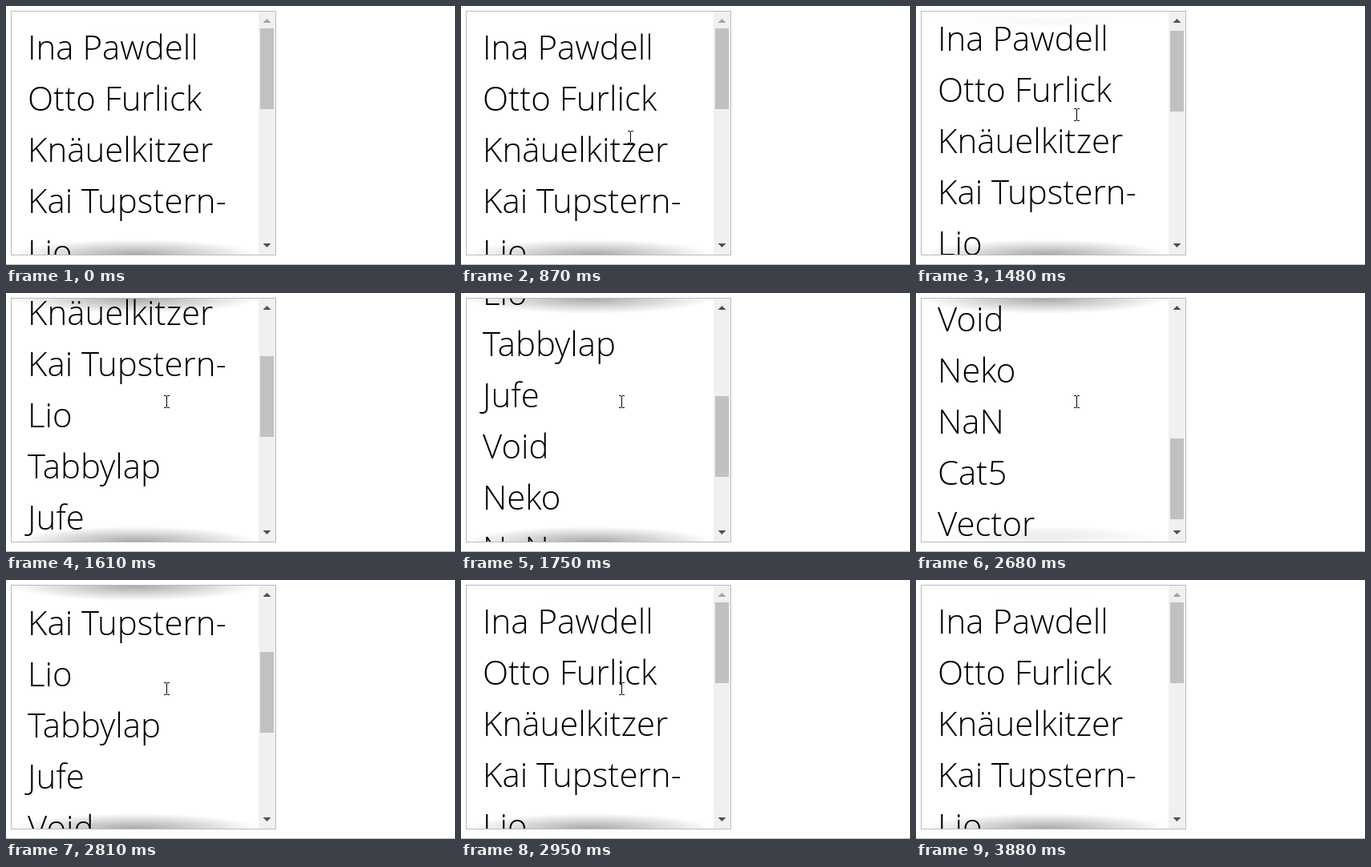
An HTML page for the animation above (4.48 s loop, 560x324 px).

```html
<!DOCTYPE html>
<html lang="en">
<head>
<meta charset="utf-8">
<title>Scrolling shadows</title>
<style>
html, body { margin: 0; width: 100%; height: 100%; overflow: hidden; background: #fff; }
#stage { position: relative; width: 560px; height: 324px; overflow: hidden; }
#stage > * { position: absolute; }
#rule { left: 0; top: 323px; width: 560px; height: 1px; background: #bbb; }
#frame { left: 6px; top: 6px; width: 329px; height: 304px; border: 1px solid #bbb; }
#list {
  left: 7px; top: 7px; width: 308px; height: 304px; box-sizing: border-box;
  padding: 12px 0 12px 20px; overflow: hidden; white-space: pre;
  font: 300 42px/64px "Open Sans", "Noto Sans", sans-serif; color: #000;
  background:
    linear-gradient(#fff 30%, rgba(255,255,255,0)) 0 0 / 100% 53px no-repeat local,
    linear-gradient(rgba(255,255,255,0), #fff 70%) 0 100% / 100% 53px no-repeat local,
    radial-gradient(farthest-side at 50% 0, rgba(0,0,0,.34), rgba(0,0,0,0)) 0 0 / 100% 19px no-repeat scroll,
    radial-gradient(farthest-side at 50% 100%, rgba(0,0,0,.34), rgba(0,0,0,0)) 0 100% / 100% 19px no-repeat scroll,
    #fff;
}
#list div { height: 64px; }
#track { left: 315px; top: 7px; width: 21px; height: 304px; background: #f0f0f0; }
#thumb { left: 317px; top: 28px; width: 17px; height: 101px; background: #c1c1c1; }
svg { left: 0; top: 0; }
</style>
</head>
<body>
<div id="stage">
  <div id="rule"></div>
  <div id="frame"></div>
  <div id="list"></div>
  <div id="track"></div>
  <div id="thumb"></div>
  <svg width="560" height="324" viewBox="0 0 560 324">
    <path id="up" d="M320.5 21l5-5 5 5z"/>
    <path id="down" d="M320.5 297l5 5 5-5z"/>
    <g id="cursor">
      <path id="beam" d="M-3-7.5h3m1 0h3M-3 7.5h3m1 0h3M.5-7V7" fill="none" stroke="#000"/>
      <path id="arrow" d="M.5.5v16l3.7-3.6 2.6 5.6 2.2-1-2.5-5.3h5z" fill="#fff" stroke="#000"/>
    </g>
  </svg>
</div>
<script>
const LOOP = 4480, MAX_SCROLL = 488, THUMB_TRAVEL = 161, PANEL_RIGHT = 337;
const $ = id => document.getElementById(id);

const lines = ["Ina Pawdell", "Otto Furlick", "Knäuelkitzer", "Kai Tupstern-", "Lio",
  "Tabbylap", "Jufe", "Void", "Neko", "NaN", "Cat5", "Vector"];
for (const line of lines) {
  $("list").appendChild(document.createElement("div")).textContent = line;
}

// Steps are [time, value]; each value holds until the next step.
const scrollSteps = [
  [0, 0],
  [1480, 11], [1540, 72], [1610, 155], [1680, 236], [1750, 308],
  [1810, 372], [1880, 428], [1950, 470], [2020, MAX_SCROLL],
  [2680, 467], [2750, 345], [2810, 190], [2880, 60], [2950, 0]
];

const mix = (a, b, p) => a.map((v, i) => Math.round(v + (b[i] - v) * p));
const entry = [262, 291], rest = [200, 136], exit = [449, 306];
const cursorSteps = [[0, null]];
for (let k = 0; k < 8; k++) {
  cursorSteps.push([590 + 70 * k, mix(entry, rest, 1 - (1 - k / 7) ** 2)]);
}
[3610, 3680, 3740, 3810].forEach((t, k) =>
  cursorSteps.push([t, mix(rest, exit, ((k + 1) / 4) ** 2)]));
cursorSteps.push([3880, null]);

function valueAt(steps, t) {
  let value;
  for (const [start, v] of steps) if (t >= start) value = v;
  return value;
}

const show = (id, on) => $(id).setAttribute("visibility", on ? "visible" : "hidden");
const arrowColor = enabled => enabled ? "#505050" : "#a3a3a3";

function draw(t) {
  const scroll = valueAt(scrollSteps, t);
  $("list").scrollTop = scroll;
  $("thumb").style.top = 28 + Math.floor(scroll / MAX_SCROLL * THUMB_TRAVEL) + "px";
  $("up").setAttribute("fill", arrowColor(scroll > 0));
  $("down").setAttribute("fill", arrowColor(scroll < MAX_SCROLL));

  const pos = valueAt(cursorSteps, t);
  show("beam", pos && pos[0] < PANEL_RIGHT);
  show("arrow", pos && pos[0] >= PANEL_RIGHT);
  if (pos) $("cursor").setAttribute("transform", `translate(${pos})`);
}

const begin = performance.now();
function tick() {
  draw((performance.now() - begin) % LOOP);
  requestAnimationFrame(tick);
}
tick();
</script>
</body>
</html>
```
